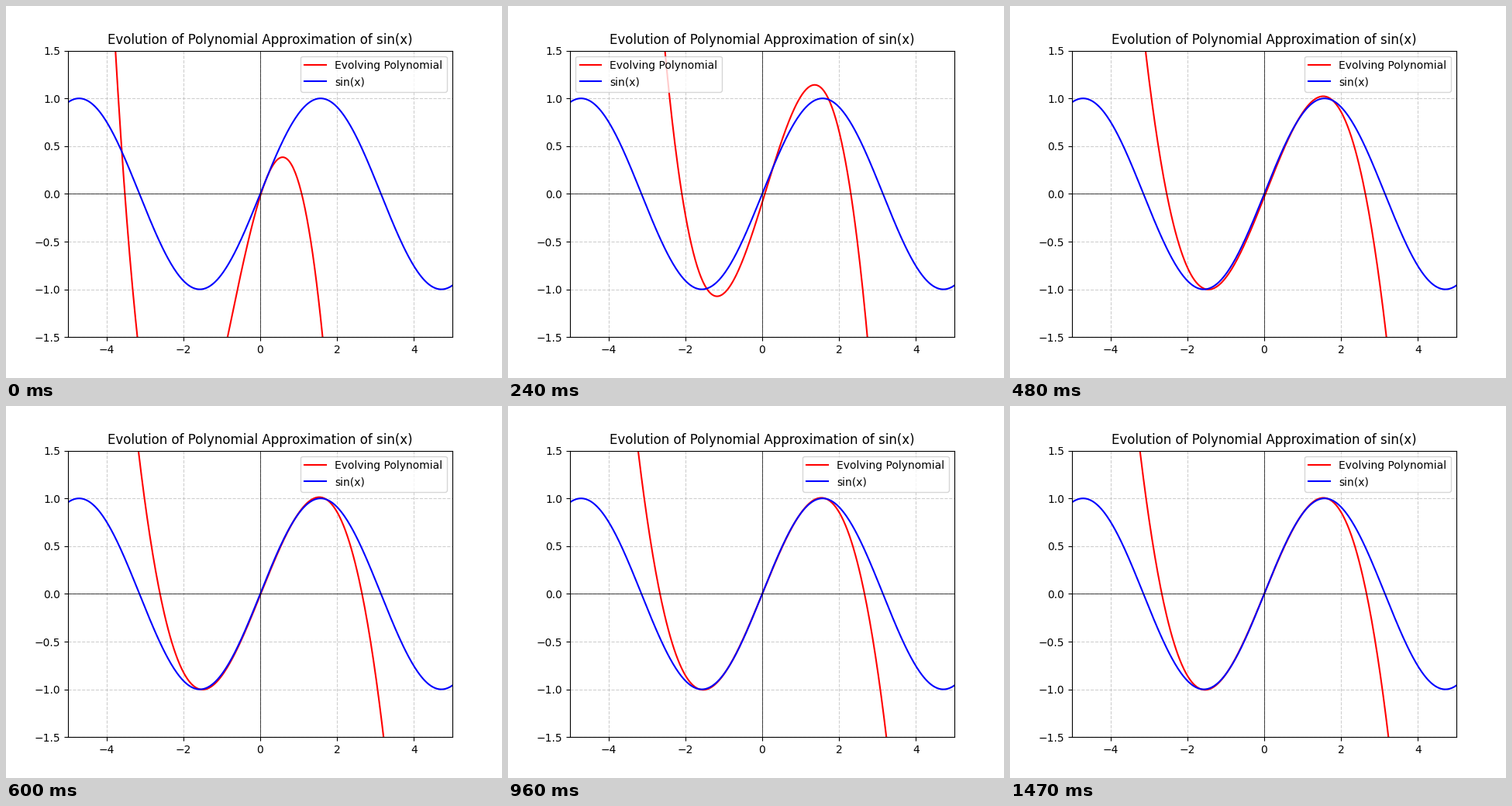
These frames come from a looping animation (640 by 480 pixels, 1500 ms). A matplotlib script:

```python
import numpy as np
import matplotlib.pyplot as plt
from matplotlib.animation import FuncAnimation

FRAMES = 50
INTERVAL = 30

# The cubic's constant to x^3 coefficients once the search has settled
LIMIT = np.array([0.0, 0.981, 0.0, -0.1383])

# Offsets from the limit: first guess, overshoot, close fit
GUESS = np.array([-0.0255, 0.307, -0.81, -0.1962])
OVERSHOOT = np.array([-0.101, 1.205, 0.127, -0.522])
CLOSE = np.array([-0.08, 0.085, 0.047, -0.0336])

OVERSHOOT_STEP = 4
CLOSE_STEP = 12
DECAY = 0.805


def coefficients(step):
    if step < OVERSHOOT_STEP:
        offset = GUESS + (OVERSHOOT - GUESS) * step / OVERSHOOT_STEP
    elif step < CLOSE_STEP:
        part = (step - OVERSHOOT_STEP) / (CLOSE_STEP - OVERSHOOT_STEP)
        offset = OVERSHOOT * (CLOSE / OVERSHOOT) ** part
    else:
        offset = CLOSE * DECAY ** (step - CLOSE_STEP)
    return LIMIT + offset


def cubic(step):
    return np.polynomial.polynomial.polyval(x, coefficients(step))


x = np.linspace(-5, 5, 400)

fig, ax = plt.subplots(figsize=(6.4, 4.8), dpi=100)
curve, = ax.plot(x, cubic(0), color="red", label="Evolving Polynomial")
ax.plot(x, np.sin(x), color="blue", label="sin(x)")
ax.axhline(0, color="black", linewidth=0.5)
ax.axvline(0, color="black", linewidth=0.5)
ax.set_xlim(-5, 5)
ax.set_ylim(-1.5, 1.5)
ax.grid(True, linestyle="--", alpha=0.6)
ax.set_title("Evolution of Polynomial Approximation of sin(x)")
ax.legend(loc="best")


def update(step):
    curve.set_ydata(cubic(step))
    return curve,


anim = FuncAnimation(fig, update, frames=FRAMES, interval=INTERVAL,
                     repeat=True, repeat_delay=0)
plt.show()
```
